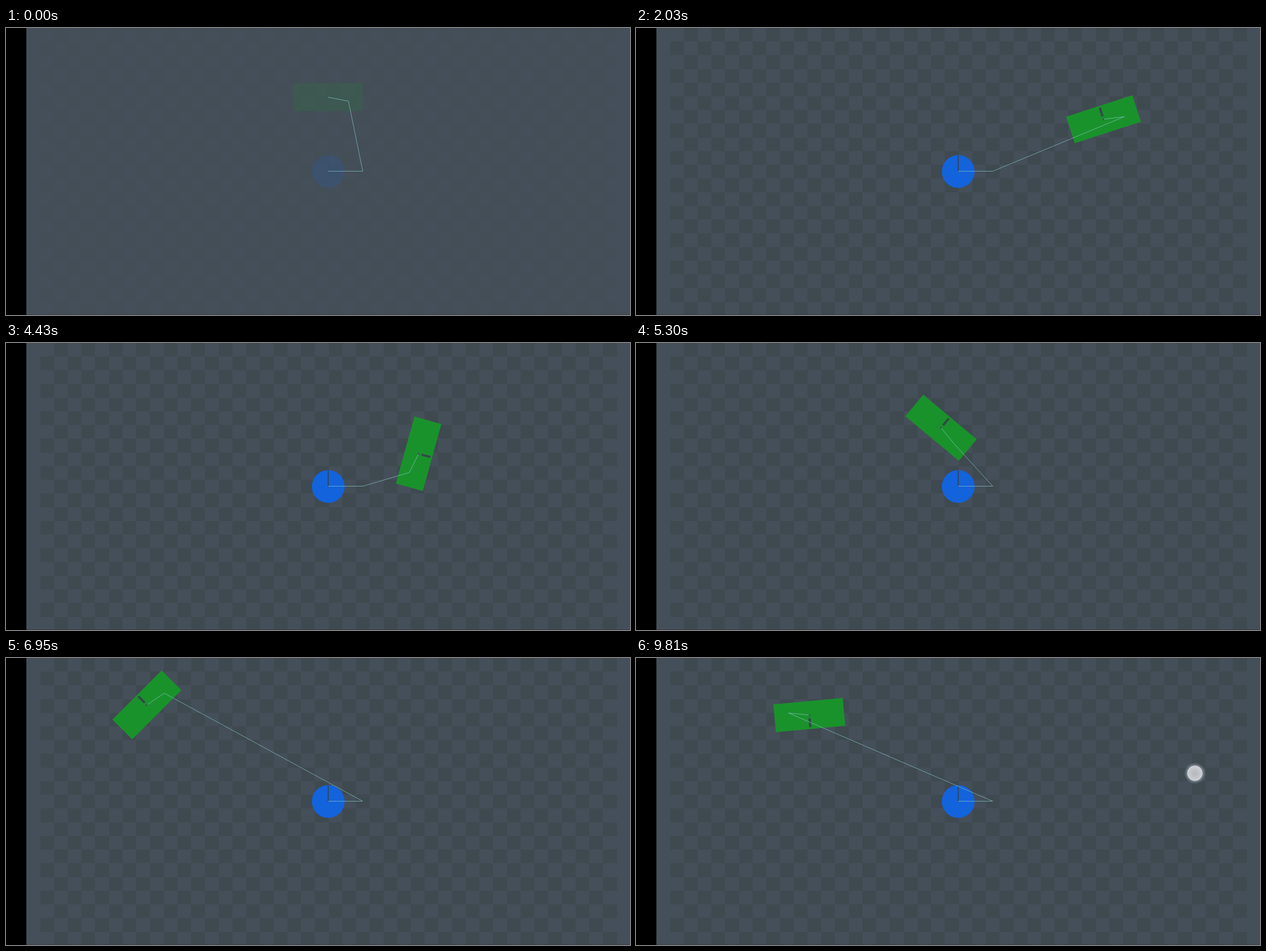
An HTML page with a canvas that plays this animation: 1102 by 508 pixels, repeating every 9850 ms.

```html
<!DOCTYPE html>
<html lang="en">
<head>
<meta charset="utf-8">
<title>Joint drag</title>
<style>
html, body { margin: 0; width: 100%; height: 100%; overflow: hidden; background: #454f59; }
canvas { display: block; }
</style>
</head>
<body>
<canvas id="stage" width="1102" height="508"></canvas>
<script>
const ctx = document.getElementById('stage').getContext('2d');
const LOOP = 9850;
const TILE = 24.24;
const BASE = { x: 569, y: 254 };
const PIVOT = { x: 630, y: 253.5 };
const ANCHOR = { x: 36.3, y: 7 }, GRIP = { x: 13, y: 15 };
const BOX = { w: 123, h: 49.4 };

// Turning points of the swing: ms, centre x, centre y, degrees
const SWING = [
  [450, 568.5, 122.5, 0],
  [2030, 825.5, 161.5, -18],
  [2980, 950, 227, 82],
  [3680, 948.5, 244.5, 151],
  [4970, 562, 157, 60],
  [5300, 538.7, 150, 40],
  [5980, 522, 166, 0],
  [6170, 473.5, 153, -14],
  [6950, 249, 83, -45],
  [7950, 247, 114, -69.5],
  [8900, 283, 109, 58],
  [9810, 306, 101, 174.8]
];
const DRAGS = [{ start: 450, end: 1680 }, { start: 5980, end: 6930 }];
const LAST_TOUCH = { start: 9730, x: 987, y: 204 };

const clamp = (v, lo = 0, hi = 1) => Math.max(lo, Math.min(hi, v));

// Cubic Hermite curve; each slope comes from the neighbouring points
function poseAt(time) {
  const last = SWING.length - 1;
  const t = clamp(time, SWING[0][0], SWING[last][0]);
  const i = clamp(SWING.findIndex(p => p[0] > t) - 1, 0, last - 1);
  const j = t === SWING[last][0] ? last - 1 : i;
  const a = SWING[j], b = SWING[j + 1], span = b[0] - a[0], u = (t - a[0]) / span;
  const slope = (n, k) => {
    if (n === 0 || n === last) return 0;
    const p = SWING[n - 1], q = SWING[n + 1];
    return (q[k] - p[k]) / (q[0] - p[0]);
  };
  const ease = u * u * (3 - 2 * u);
  const [x, y, degrees] = [1, 2, 3].map(k =>
    a[k] + (b[k] - a[k]) * ease +
    span * u * (1 - u) * ((1 - u) * slope(j, k) - u * slope(j + 1, k)));
  return { x, y, angle: degrees * Math.PI / 180 };
}

function toWorld(pose, local) {
  const c = Math.cos(pose.angle), s = Math.sin(pose.angle);
  return { x: pose.x + local.x * c - local.y * s, y: pose.y + local.x * s + local.y * c };
}

function disc(x, y, r, fill) {
  ctx.fillStyle = fill;
  ctx.beginPath();
  ctx.arc(x, y, r, 0, 2 * Math.PI);
  ctx.fill();
}

function line(width, ...points) {
  ctx.lineWidth = width;
  ctx.beginPath();
  points.forEach(p => ctx.lineTo(p.x, p.y));
  ctx.stroke();
}

function drawBoard() {
  const edgeX = n => Math.round(60.5 + n * TILE), edgeY = n => Math.round(n * TILE - 0.2);
  ctx.fillStyle = '#3f4950';
  for (let row = 0; row < 21; row++) {
    for (let col = (row + 1) % 2; col < 42; col += 2) {
      const x = edgeX(col), y = edgeY(row);
      ctx.fillRect(x, y, edgeX(col + 1) - x, edgeY(row + 1) - y);
    }
  }
}

function drawBodies(pose) {
  disc(BASE.x, BASE.y, 29, '#1363dc');
  ctx.fillStyle = '#34465c';
  ctx.fillRect(BASE.x - 1, BASE.y - 28, 2, 28);
  ctx.save();
  ctx.translate(pose.x, pose.y);
  ctx.rotate(pose.angle);
  ctx.fillStyle = '#1a922c';
  ctx.fillRect(-BOX.w / 2, -BOX.h / 2, BOX.w, BOX.h);
  ctx.fillStyle = '#36474a';
  ctx.fillRect(-2, -21.5, 4, 16);
  ctx.fillRect(-1.5, -1.5, 3, 3);
  ctx.restore();
}

function drawJoint(pose) {
  ctx.strokeStyle = 'rgba(135,200,200,.7)';
  line(1, { x: BASE.x, y: PIVOT.y }, PIVOT, toWorld(pose, ANCHOR), pose);
}

function drawBubble(x, y, alpha) {
  ctx.globalAlpha = alpha;
  const glow = ctx.createRadialGradient(x, y, 13, x, y, 19);
  glow.addColorStop(0, 'rgba(190,200,215,.5)');
  glow.addColorStop(1, 'rgba(190,200,215,0)');
  disc(x, y, 19, glow);
  const core = ctx.createRadialGradient(x, y, 3, x, y, 13.5);
  core.addColorStop(0, '#b9bdbf');
  core.addColorStop(1, '#cfd3d8');
  disc(x, y, 13.5, core);
  ctx.globalAlpha = 1;
}

// Pointing hand: index finger, thumb and three folded fingers
function drawHand(x, y, alpha) {
  ctx.save();
  ctx.globalAlpha = alpha;
  ctx.translate(x, y);
  ctx.beginPath();
  ctx.rect(-25, -6, 70, 78);
  ctx.clip();
  ctx.lineCap = ctx.lineJoin = 'round';
  const skin = ctx.createLinearGradient(-12, 50, 38, 42);
  skin.addColorStop(0, '#625856');
  skin.addColorStop(0.45, '#7f7470');
  skin.addColorStop(1, '#a0938d');
  ctx.strokeStyle = skin;
  line(6, { x: -16, y: 21 }, { x: -4, y: 40 }, { x: 10, y: 60 });
  line(7, { x: 0, y: 0 }, { x: 4, y: 22 }, { x: 13, y: 62 });
  for (let i = 0; i < 3; i++) {
    line(11, { x: 17 + 8 * i, y: 26 + 5 * i }, { x: 20 + 7 * i, y: 48 }, { x: 15 + 7 * i, y: 74 });
  }
  ctx.restore();
}

function drawTouches(t, pose) {
  for (const { start, end } of DRAGS) {
    if (t < start || t > end) continue;
    const fade = clamp((t - start) / 120) * clamp((end - t) / 120);
    const { x, y } = toWorld(pose, GRIP);
    drawHand(x, y, 0.85 * fade);
    drawBubble(x, y, 0.48 * fade);
  }
  if (t >= LAST_TOUCH.start) drawBubble(LAST_TOUCH.x, LAST_TOUCH.y, 0.97);
}

function draw(t) {
  const pose = poseAt(t);
  ctx.fillStyle = '#454f59';
  ctx.fillRect(0, 0, 1102, 508);
  ctx.globalAlpha = 0.15 + 0.85 * clamp(t / 300);
  drawBoard();
  drawBodies(pose);
  ctx.globalAlpha = 1;
  ctx.fillStyle = '#000';
  ctx.fillRect(0, 0, 36, 508);
  ctx.fillStyle = '#363a46';
  ctx.fillRect(36, 507, 1066, 1);
  drawJoint(pose);
  drawTouches(t, pose);
}

const begin = performance.now();
function tick() {
  draw((performance.now() - begin) % LOOP);
  requestAnimationFrame(tick);
}
tick();
</script>
</body>
</html>
```
